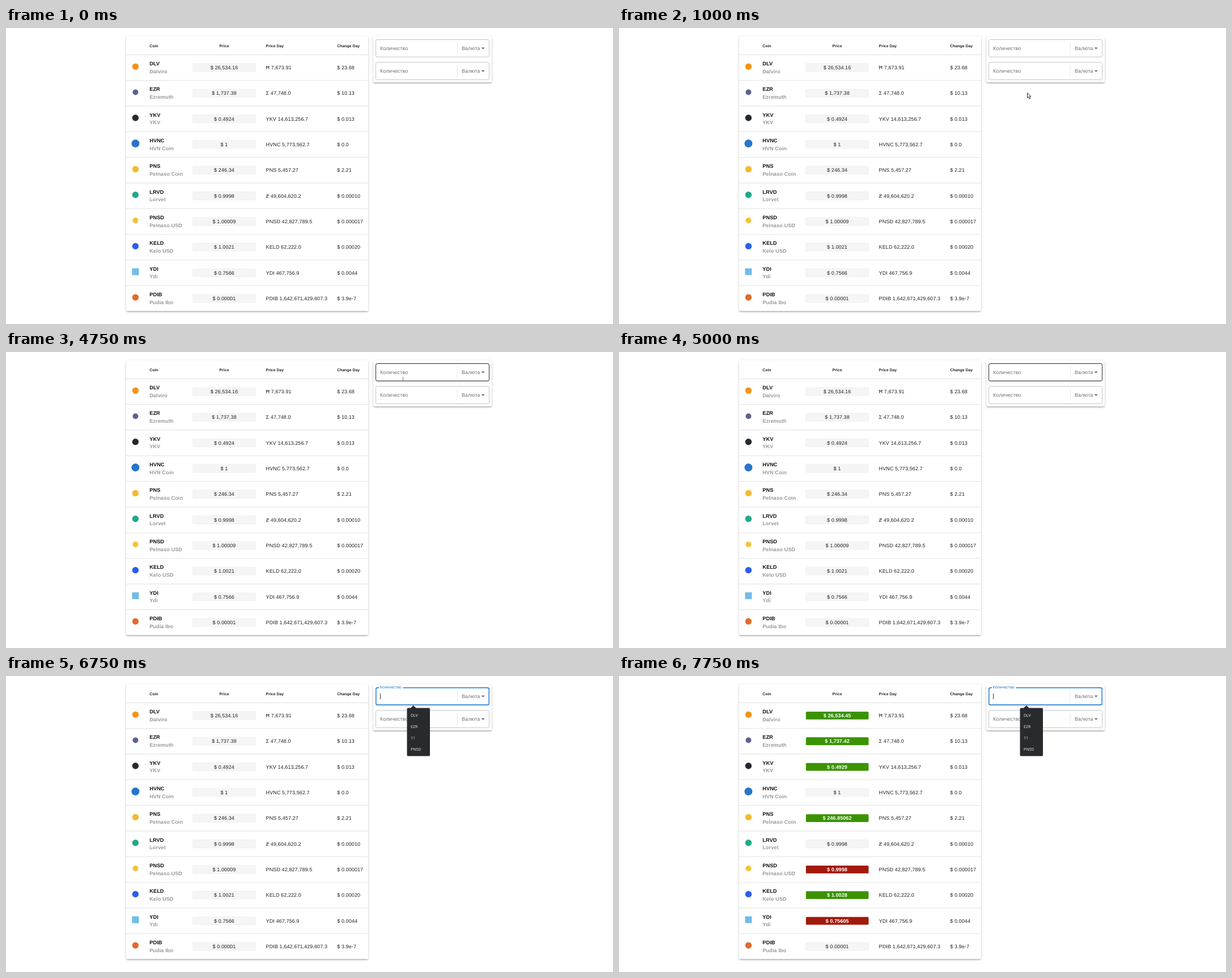
Animation, 1071 px wide and 523 px high, one loop 8 s. Source, as an HTML page:

```html
<!DOCTYPE html>
<html lang="ru">
<head>
<meta charset="utf-8">
<title>Coin prices</title>
<style>
html, body { margin: 0; width: 100%; height: 100%; overflow: hidden; background: #fff; }
.card {
  position: absolute; background: #fff; border-radius: 2.5px;
  box-shadow: 0 2px 2px -1.3px rgba(0,0,0,.2), 0 2px 2.7px rgba(0,0,0,.14), 0 .7px 5.3px rgba(0,0,0,.12);
}
.table { left: 212px; top: 15px; width: 427px; height: 485px; }
.form { left: 648px; top: 15px; width: 209px; height: 81px; }
svg { position: absolute; left: 0; top: 0; }
text {
  font: 9px "Liberation Sans", Arial, sans-serif; letter-spacing: .096px;
  fill: #212121; text-rendering: geometricPrecision; white-space: pre;
}
.head { font-size: 6.8px; font-weight: bold; letter-spacing: .07px; }
.ticker { font-size: 9.2px; font-weight: bold; fill: #111; }
.name { font-size: 9.15px; font-weight: bold; fill: #999; }
.price, .price-head { text-anchor: middle; }
.fresh .price { font-weight: bold; fill: #fff; }
.rule { stroke: #dedede; stroke-width: .9; }
.chip { fill: #f5f5f5; stroke: #ececec; stroke-width: .7; }
.up { fill: #3b9300; }
.down { fill: #a3190c; }
.hint { fill: #707070; }
.border { fill: none; stroke: #c4c4c4; }
.border.hover { stroke: #2a2a2a; }
.border.focus { stroke: #1976d2; stroke-width: 1.4; }
.label { font-size: 6.95px; letter-spacing: .07px; fill: #1976d2; }
.label.rising { fill: #3f88cc; font-size: 7.05px; }
.menu text { font: 7px "Open Sans", "Noto Sans", sans-serif; letter-spacing: 0; fill: #eee; }

/* Everything changes in hard steps on one shared 8 s clock */
.step { animation: 8s step-end infinite; }
.pointer { animation-name: pointer; }
.beam { animation-name: beam; }
.hover.first { animation-name: hover-first; }
.hover.second { animation-name: hover-second; }
.idle { animation-name: idle; }
.focused { animation-name: focused; }
.rising { animation-name: rising; }
.settled { animation-name: settled; }
.caret { animation-name: caret; }
.stale { animation-name: stale; }
.fresh { animation-name: fresh; }
@keyframes pointer {
  0% { opacity: 0; transform: translate(570px, 13px); }
  3.125% { opacity: 1; transform: translate(570px, 13px); }
  6.25% { transform: translate(742px, 129px); }
  9.375% { transform: translate(724px, 115px); }
  12.5% { transform: translate(720px, 114px); }
  56.25% { transform: translate(697px, 57px); }
  59.375%, 100% { opacity: 0; transform: translate(697px, 57px); }
}
@keyframes beam { 0%, 62.5%, 100% { opacity: 0; } 59.375% { opacity: 1; } }
@keyframes hover-second { 0%, 59.375%, 100% { opacity: 0; } 56.25% { opacity: 1; } }
@keyframes hover-first { 0%, 71.875%, 100% { opacity: 0; } 59.375% { opacity: 1; } }
@keyframes idle { 0% { opacity: 1; } 71.875%, 100% { opacity: 0; } }
@keyframes focused { 0% { opacity: 0; } 71.875%, 100% { opacity: 1; } }
@keyframes rising { 0% { opacity: 1; } 75%, 100% { opacity: 0; } }
@keyframes settled { 0% { opacity: 0; } 75%, 100% { opacity: 1; } }
@keyframes caret { 0%, 84.375%, 96.875%, 100% { opacity: 1; } 78.125%, 90.625% { opacity: 0; } }
@keyframes stale { 0% { opacity: 1; } 96.875%, 100% { opacity: 0; } }
@keyframes fresh { 0% { opacity: 0; } 96.875%, 100% { opacity: 1; } }
</style>
</head>
<body>
<div class="card table"></div>
<div class="card form"></div>
<svg width="1071" height="523" viewBox="0 0 1071 523">
  <text class="head" x="253.2" y="33.5">Coin</text>
  <text class="head price-head" x="385" y="33.5">Price</text>
  <text class="head" x="458.6" y="33.5">Price Day</text>
  <text class="head" x="584.2" y="33.5">Change Day</text>
  <g id="rows"></g>

  <g id="fields"></g>
  <text class="hint step idle" x="660" y="38.8">Количество</text>
  <text class="hint" x="660" y="79">Количество</text>
  <rect class="border step hover first" x="652.5" y="20.5" width="200" height="30.7" rx="2.7"/>
  <rect class="border step hover second" x="652.5" y="60.7" width="200" height="30.7" rx="2.7"/>

  <g class="step focused">
    <rect class="border focus" x="652.8" y="20.7" width="199.4" height="30.3" rx="2.5"/>
    <path d="M658 20.5H700.5" stroke="#fff" stroke-width="3"/>
    <text class="label step rising" x="659.8" y="24">Количество</text>
    <text class="label step settled" x="659.8" y="22.4">Количество</text>
    <rect class="step caret" x="660" y="31" width="1" height="10" fill="#333"/>
    <g class="menu">
      <path d="M713.5 57L718.7 52L724 57z" fill="#292a2d"/>
      <rect x="707.5" y="56.5" width="40.5" height="85" rx="2" fill="#292a2d"/>
      <text x="714" y="71.7">DLV</text>
      <text x="714" y="91.8">EZR</text>
      <text x="714" y="111.9">11</text>
      <text x="714" y="132">PNSD</text>
    </g>
  </g>

  <rect class="step beam" x="700" y="44" width="1" height="8" fill="#777"/>
  <path class="step pointer" d="M.5 .6V9.6L2.6 7.7L4.2 11.3L5.7 10.6L4.2 7.1H6.8z" fill="#fff" stroke="#111" stroke-width=".9"/>
</svg>
<script>
// ticker, name, logo colour, price, day volume, day change, next price, direction
const coins = [
  ['DLV', 'Dalviro', '#f7931a', '26,534.16', 'Ħ 7,673.91', '23.68', '26,534.45', 'up'],
  ['EZR', 'Ezremuth', '#5d6192', '1,737.38', 'Σ 47,748.0', '10.13', '1,737.42', 'up'],
  ['YKV', 'YKV', '#23292f', '0.4924', 'YKV 14,613,256.7', '0.013', '0.4929', 'up'],
  ['HVNC', 'HVN Coin', '#2775ca', '1', 'HVNC 5,773,562.7', '0.0'],
  ['PNS', 'Pelnaso Coin', '#f3ba2f', '246.34', 'PNS 5,457.27', '2.21', '246.85062', 'up'],
  ['LRVD', 'Lorvet', '#22a88a', '0.9998', 'Ƶ 49,604,620.2', '0.00010'],
  ['PNSD', 'Pelnaso USD', '#f5c136', '1.00009', 'PNSD 42,827,789.5', '0.000017', '0.9998', 'down'],
  ['KELD', 'Kelo USD', '#2b5df0', '1.0021', 'KELD 62,222.0', '0.00020', '1.0028', 'up'],
  ['YDI', 'Ydi', '#70bde8', '0.7566', 'YDI 467,756.9', '0.0044', '0.75605', 'down'],
  ['PDIB', 'Pudia Ibo', '#e36a2c', '0.00001', 'PDIB 1,642,671,429,607.3', '3.9e-7']
];
const radii = { HVNC: 7, EZR: 5, PNSD: 5 };

const text = (x, y, content, cls = '') => `<text class="${cls}" x="${x}" y="${y}">${content}</text>`;

const logo = (ticker, color, y) => ticker === 'YDI'
  ? `<rect x="222.4" y="${y + 15}" width="12" height="12" fill="${color}"/>`
  : `<circle cx="228.4" cy="${y + 21.1}" r="${radii[ticker] || 5.7}" fill="${color}"/>`;

function row([ticker, name, color, price, volume, change, next, trend], i) {
  const y = 47 + i * 45.33;
  const base = y + 25.9;
  const update = next ? `<g class="step fresh">
    <rect class="${trend}" x="329.8" y="${y + 16}" width="110.6" height="13.8" rx="1.6"/>
    ${text(385, base, '$ ' + next, 'price')}</g>` : '';
  return `<path class="rule" d="M212 ${y + .3}H639"/>
    ${logo(ticker, color, y)}
    ${text(253.2, y + 19.1, ticker, 'ticker')}
    ${text(253.2, y + 32.6, name, 'name')}
    <g class="${next ? 'step stale' : ''}">
      <rect class="chip" x="329.6" y="${y + 15.8}" width="111" height="14.2" rx="1.6"/>
      ${text(385, base, '$ ' + price, 'price')}
    </g>${update}
    ${text(458.6, base, volume)}
    ${text(584.2, base, '$ ' + change)}`;
}

const field = y => `<rect class="border" x="652.5" y="${y}" width="200" height="30.7" rx="2.7"/>
  <path d="M796.3 ${y + 5.5}v19.5" stroke="#e0e0e0" stroke-width=".8"/>
  ${text(804, y + 18.3, 'Валюта', 'hint')}
  <path d="M838.6 ${y + 14}h6.2l-3.1 3.1z" fill="#666"/>`;

document.getElementById('rows').innerHTML = coins.map(row).join('');
document.getElementById('fields').innerHTML = [20.5, 60.7].map(field).join('');
</script>
</body>
</html>
```
